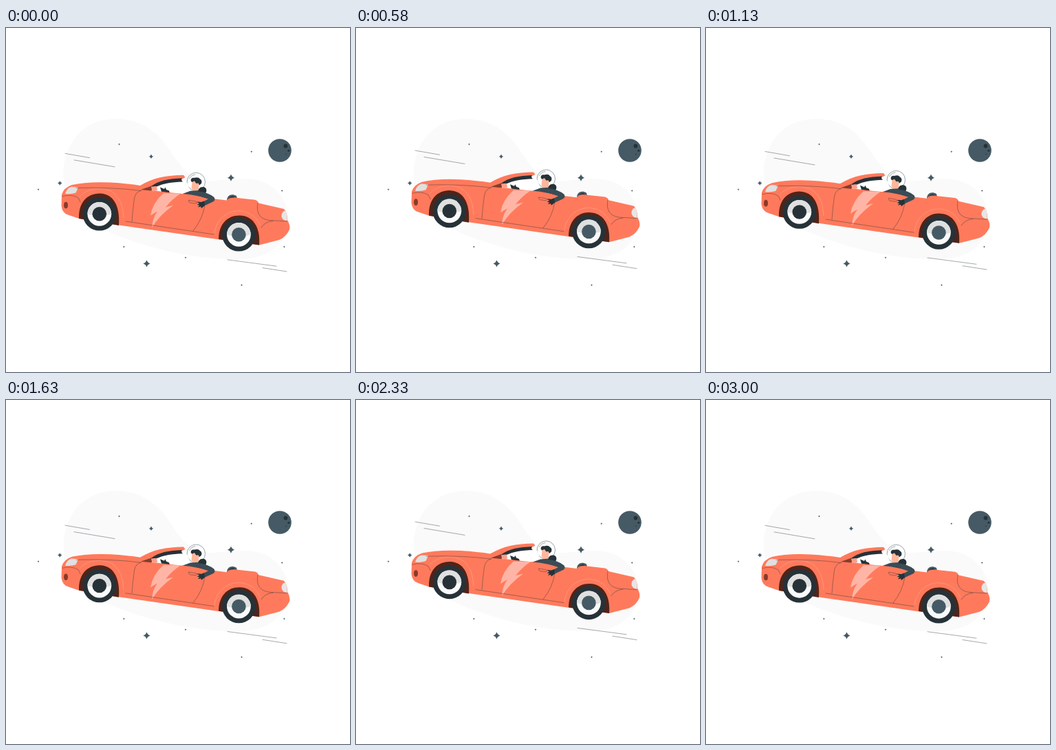
An HTML page for the animation above (3.04 s loop, 500 by 500 pixels).

```html
<!DOCTYPE html>
<html lang="en">
<head>
<meta charset="utf-8">
<title>Flying car</title>
<style>
html, body { margin: 0; width: 100%; height: 100%; overflow: hidden; background: #fff; }
svg { display: block; width: 100vw; height: 100vh; }
.slate { fill: #455a64; }
.suit { fill: #3a4c55; }
.dark { fill: #263238; }
.coral { fill: #ff7a5c; }
.brown { fill: #4f241a; }
.line { fill: none; stroke: #263238; stroke-width: .42; stroke-linecap: round; }
.shine { fill: none; stroke: #ffa38f; stroke-width: .6; }
</style>
</head>
<body>
<svg viewBox="0 0 500 500">
  <defs>
    <g id="wheel">
      <circle class="dark" r="24.3"/>
      <circle r="17.4" fill="#fafafa"/>
      <path d="M-17.4 0A17.4 17.4 0 0 1 17.4 0L10 2H-10Z" fill="#e0e0e0"/>
    </g>
  </defs>

  <path fill="#fafafa" d="M84 222C80 180 104 132 160 132C203 132 226 158 243 185C259 209 274 224 302 222C322 220 336 218.5 355 219.5C384 222 406 241 410 270C414 304 392 332 348 335.5C300 338 246 329 202 315.5C156 301 90 280 84 222Z"/>

  <g class="slate" id="sky">
    <circle cx="398" cy="178" r="16.8"/>
    <g class="dark">
      <circle cx="406.5" cy="171.5" r="2.9"/>
      <circle cx="410.8" cy="178.3" r="1.6"/>
      <circle cx="407" cy="183.5" r=".8"/>
    </g>
  </g>

  <g id="car">
    <path class="line" d="M86 182.4L121.5 188.6M99 191.9L158 201.8M322 336.8L393 346.2M373 348.6L408 354"/>

    <!-- seat and driver -->
    <path class="slate" d="M321 251C321 243 328 240 335 244L337 252Z"/>
    <path class="dark" d="M323 250Q326 243 332 245L333 252H323Z"/>
    <circle cx="276.3" cy="223.5" r="13.2" fill="#fff" stroke="#455a64" stroke-width=".55"/>
    <path d="M270.5 223L281 222.5L280.5 229L279.5 237.5L271 238L271.5 234.8Q268.8 233.5 270 229Z" fill="#ffb79b"/>
    <path class="dark" d="M268.5 221.5Q269 217 273.5 217.8Q280 216 282 219.5Q285.5 221 284 226L281 228.5L279.5 225.5L276.5 226L274 222.5L270 224Z"/>
    <path class="line" d="M266.5 219Q269 213.5 275 213"/>
    <path d="M222 230L258 218L264 226L268 237L255 242L223 238Z" fill="#fff"/>
    <path class="dark" d="M224 231.5L230 234L231.5 231.5L233 235L237 236.5L238 240L226 238Z"/>
    <path class="suit" d="M254 242L268 236.8L281 236L289 249H254Z"/>
    <path class="dark" d="M279.5 238C278.5 232 286 229 290 232.5C293 236 290.5 241 287 243Z"/>

    <!-- body -->
    <path class="coral" d="M81 242Q84 232 96 228Q118 223 152 224.5Q177 226 195 229C213 218 233 214 258 213.8L260.5 217L257 219C238 219 225 223 211 230L212 236L237 239L267 242L300 248L321 250.5Q324 246 332 246.5L362 249.8Q366 251 367 254.5L404 263Q409 269 409 279Q413.5 287 412 293Q407 304 397 308L368 315.5L310 307.5L164 286.5L106 277L90 271.5Q82 269 80.5 259Z"/>
    <path class="brown" d="M196 235L213 229L219 226L211 236.5Z" opacity=".7"/>
    <path class="dark" d="M211 230C222 222 236 219 256 218.3Q254 221 257 223.5C240 224 229 226 219 230.5Z"/>
    <path d="M211 231L219 230L220 236L213 237.5Z" fill="#ff9d87"/>
    <path d="M229 240L254 240.5Q241 249 232 260.5L243 257.8Q222 273 212.3 290Q212 278 220 266.5L210 272.5Q213 254 229 240Z" fill="#ffb5a5"/>

    <!-- lights -->
    <path d="M86 241Q88 233 95 230.8L105 231.5L101.5 239.5Q95 242 86 241Z" fill="#e0e0e0"/>
    <path d="M406 265.5Q400 267 400.5 274Q402 280 408.5 280Q409 271 406 265.5Z" fill="#e6e6e6"/>
    <ellipse cx="87" cy="257.5" rx="3" ry="4.8" fill="#8a3a29"/>

    <!-- seams -->
    <path class="line" d="M102 232.5Q155 231 196 236.5M197 236Q188 238 186.5 248Q184 266 183 281M174 281L302 300M289 257Q286 278 272 295M82 244.5Q96 241 105 247Q107 250 108 253M366 254.5C363 270 370 278 383 279.5L408 281M371 290Q377 281 388 280.5"/>
    <path class="line" d="M266 250.5L276 252Q279 255 275 255L267 254Q264 252 266 250.5Z"/>
    <path class="shine" d="M107 245C118 232 143 230 157 240Q170 251 171 276M303 298C306 276 324 264 342 266Q361 268 370 287"/>

    <!-- arm over the door -->
    <path class="suit" d="M266 240Q273 236 281 237.5Q294 239 302.5 246Q305 250 301 252.5L288 258.5L285.5 253L294 248.5L281 244.5Z"/>
    <path class="dark" d="M288 251.5L284 253L277 252.5L281 255L277.5 257L281 257.5L279 260.5L283 259.5L284 262L289 258Z"/>

    <path class="brown" d="M106 277C105 254 118 240 137 240.5C155 241 166 257 164 287Z"/>
    <path class="brown" d="M309 307C309 285 322 272 340 272.5C358 273 370 288 368 315.5Z"/>
    <use href="#wheel" x="135.8" y="270.3"/>
    <use href="#wheel" x="338.4" y="300.3"/>
    <circle class="dark" cx="135.8" cy="270.3" r="10.3"/>
    <circle class="slate" cx="338.4" cy="300.3" r="10.3"/>
  </g>
</svg>
<script>
const LOOP = 3040, FRAMES = 73, LIFT = 5.4;
const sky = document.getElementById('sky');
const car = document.getElementById('car');

function addStar(x, y, r) {
  const star = document.createElementNS('http://www.w3.org/2000/svg', 'path');
  const c = r * 0.22;
  star.setAttribute('d', `M${x} ${y - r}Q${x + c} ${y - c} ${x + r} ${y}Q${x + c} ${y + c} ${x} ${y + r}` +
    `Q${x - c} ${y + c} ${x - r} ${y}Q${x - c} ${y - c} ${x} ${y - r}Z`);
  sky.append(star);
}

[[211, 186.8, 3.2], [327, 217.8, 5.2], [78.3, 225.5, 3.2], [204.5, 342.5, 5.2],
 [164.5, 169, 1.5], [356.8, 179.8, 1.5], [47, 234.8, 1.5], [401.2, 236.4, 1.5],
 [171.3, 318, 1.5], [261, 333.8, 1.5], [404.4, 318, 1.5], [342.5, 373.8, 1.5]]
  .forEach(s => addStar(...s));

// The car rises and sinks twice per loop.
function draw(now) {
  const step = Math.floor(now % LOOP / LOOP * FRAMES) / FRAMES;
  const y = -LIFT * (1 - Math.cos(step * 4 * Math.PI)) / 2;
  car.setAttribute('transform', `translate(0 ${y.toFixed(3)})`);
  requestAnimationFrame(draw);
}
draw(performance.now());
</script>
</body>
</html>
```
